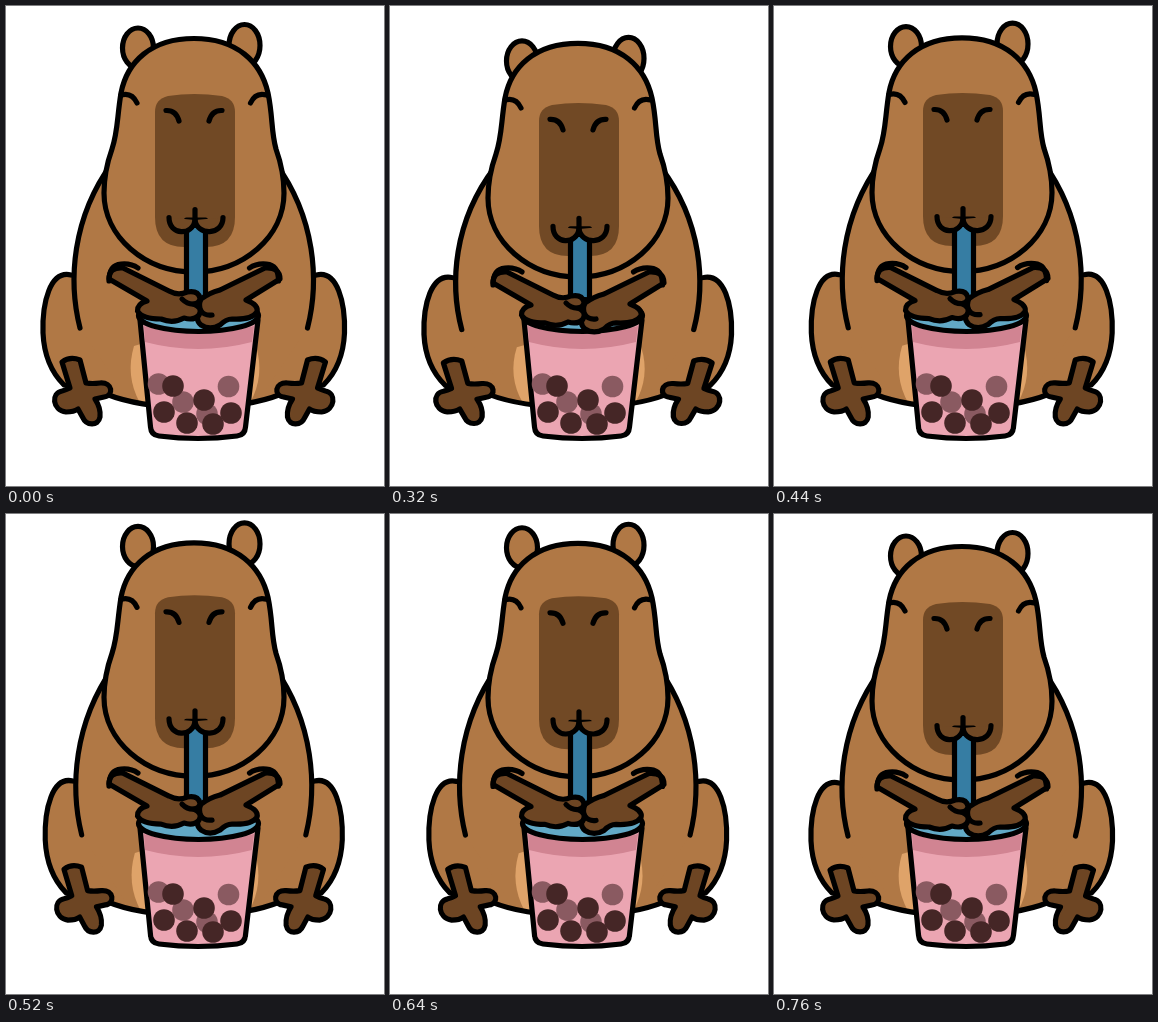
An HTML page for the animation above (840 ms loop, 378x480 px).

```html
<!DOCTYPE html>
<html>
<head>
<meta charset="utf-8">
<style>
  html, body { margin: 0; width: 100%; height: 100%; overflow: hidden; background: #fff }
  svg { display: block; width: 378px; height: 480px; fill: none; stroke-linecap: round; stroke-linejoin: round }
  .line { stroke: #000; stroke-width: 5.2 }
  .fur { fill: #b07845 }
  .snout { fill: #714925 }
  .dark { fill: #6d4523 }
</style>
</head>
<body>
<svg id="stage" viewBox="0 0 378 480"></svg>
<script>
const stage = document.getElementById('stage');
const path = (cls, d) => `<path class="${cls}" d="${d}"/>`;
const group = (id, content) => `<g id="${id}">${content}</g>`;
const mirror = content => `${content}<g transform="matrix(-1 0 0 1 375.5 0)">${content}</g>`;
const pearls = (color, spots) => spots.map(([x, y]) => `<circle cx="${x}" cy="${y}" r="10.8" fill="${color}"/>`).join('');

const torso = 'M106 157C66 212 62 275 74 322';
const haunch = 'M65 269C44 264 36 297 37 327C38 349 45 366 58 379L100 388Q135 402 189 401';
const body = mirror(path('fur', haunch) + path('fur', torso + 'L120 390L189 401V157Z') + path('line', torso)) +
  '<path fill="#dfa369" d="M134 397Q119 370 128 340L189 322L250 340Q259 370 244 397Z"/>' +
  mirror(path('line', haunch) + path('line dark',
    'M56 356Q64 350 74 354L80 377Q86 378 94 377C107 376 108 390 98 391L89 393Q95 402 94 411' +
    'C92 421 80 419 77 412L72 403Q68 406 60 406C46 404 45 387 56 385Q60 384 64 382Z'));

const ears = `<ellipse class="line fur" cx="132" cy="42" rx="15.5" ry="20"/>
  <ellipse class="line fur" cx="238.5" cy="39.5" rx="15.5" ry="21"/>`;

const head = path('line fur',
  'M188 32.5C145 32.5 121 56 115 87C111 111 112 125 106 143C101 157 98 171 98 187C98 231 139 266 188 266' +
  'C237 266 278 231 278 187C278 171 275 157 270 143C265 125 267 111 262 87C255 56 231 32.5 188 32.5Z') +
  mirror(path('line', 'M115 89Q126 86 131 97'));

const muzzle = path('snout', 'M149 106Q149 93 162 90Q188 86 216 90Q229 93 229 106V211Q229 241 200 241H178Q149 241 149 211Z') +
  path('line', 'M160 104.5Q170 104 173 115M216 104.5Q206 104 203 115');

const straw = '<path class="line" fill="#367da3" d="M180.5 214H199.5V320H180.5Z"/>';
const mouth = path('line snout', 'M163 211.5C163 230 187 230 189 214M189 214C191 230 217 230 217 211.5') +
  path('line', 'M189 203.5V214');

const cup = `<path class="line" fill="#eba5b2" d="M134 314L144.5 421Q145 429 153 430Q192 435 231 430Q239 429 239.5 421L252 314Z"/>
  <path fill="#d18492" d="M138 320Q192 336 248 320L246 336Q192 350 139 336Z"/>` +
  pearls('#8a5a61', [[152.5, 378], [177, 396], [201, 408], [222.5, 380.5]]) +
  pearls('#452626', [[167, 380], [158, 406], [181, 417], [198, 394], [207, 418], [225, 407]]);

const rim = '<ellipse class="line" fill="#62a9c6" cx="192.5" cy="309.5" rx="60" ry="16"/>';

const arms =
  path('line dark', 'M259 262L214 284Q203 287 195 293Q192 299 195 305Q188 313 195 319Q204 325 214 319Q220 313 226 313' +
    'Q246 314 251 306Q253 299 240 294L274 273Q274 261 259 262Z') +
  path('line', 'M195 305Q199 310 206 309') +
  path('line dark', 'M117 262L163 285Q172 290 181 286Q192 284 194 292Q194 297 188 298Q197 302 193 309Q188 315 178 312' +
    'Q167 318 155 313Q136 313 131.5 305Q131 298 141 295L103 273Q103 261 117 262Z') +
  path('line', 'M176 293Q182 299 189 298') +
  mirror(path('line', 'M103 275Q103 259 115 258Q125 257 132 262'));

stage.innerHTML = group('body', body) + group('ears', ears) + group('head', head) +
  group('muzzle', muzzle) + group('straw', straw) + group('mouth', mouth) + cup + rim + group('arms', arms);

const lift = { ears: 13, head: 5, muzzle: 9, straw: 9, mouth: 9, arms: 4 };
const poses = [0, 1, -0.75, 0];

// Rest, squash, stretch and settle, each drawn in four held steps.
function squash(ms) {
  if (ms < 240) return 0;
  const u = ms - 240;
  const phase = Math.floor(u / 200);
  const p = (Math.min(3, Math.floor(u % 200 / 40)) + 1) / 4;
  const ease = phase < 2 ? 1 - (1 - p) ** 3.5 : p * p * (3 - 2 * p);
  return poses[phase] + (poses[phase + 1] - poses[phase]) * ease;
}

function draw() {
  const s = squash(performance.now() % 840);
  for (const id in lift)
    document.getElementById(id).setAttribute('transform', `translate(0 ${lift[id] * s})`);
  document.getElementById('body').setAttribute('transform',
    `translate(188 401) scale(${1 + 0.02 * s} ${1 - 0.02 * s}) translate(-188 -401)`);
  requestAnimationFrame(draw);
}
draw();
</script>
</body>
</html>
```
